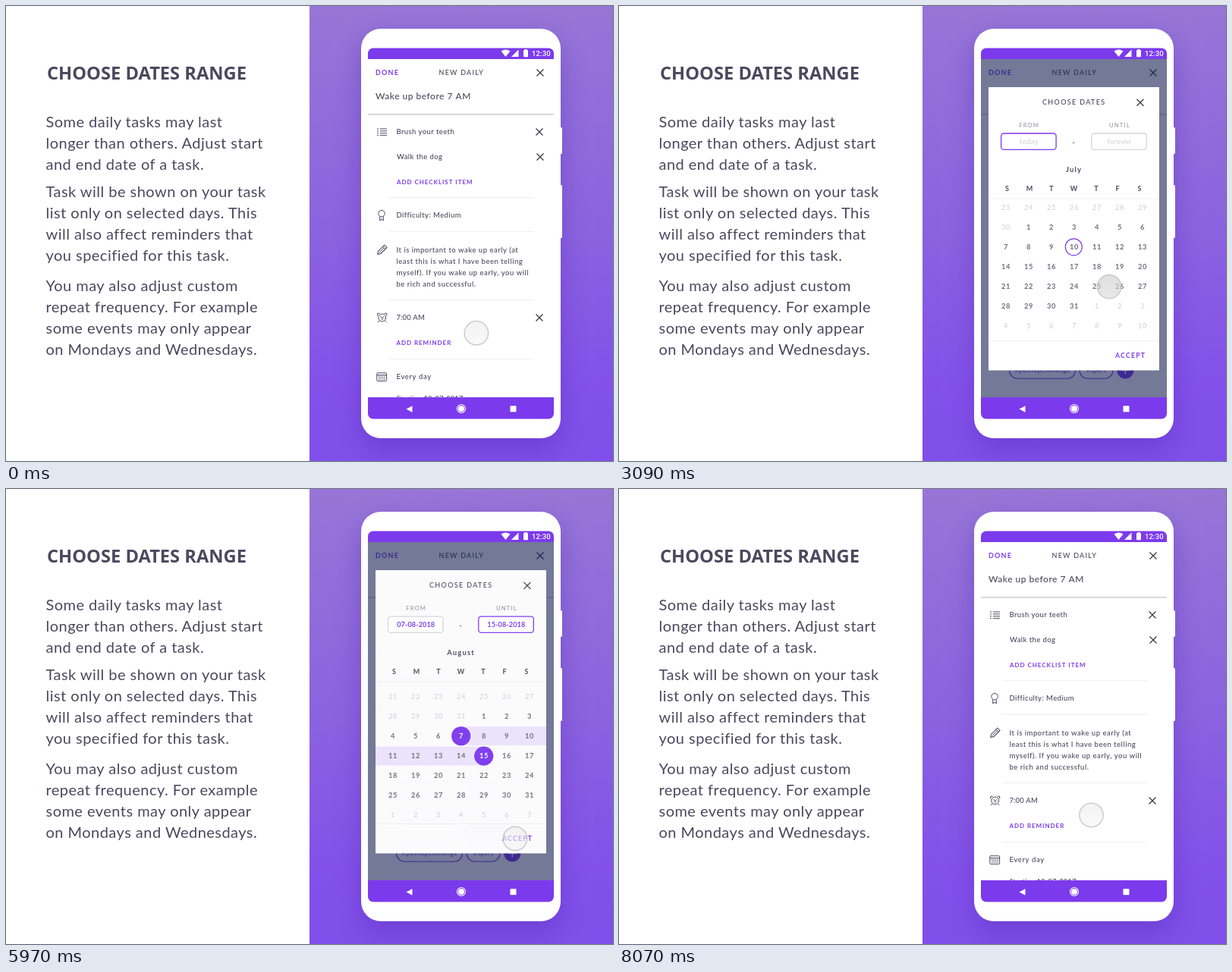
Recreate the animation shown at these times as an HTML page with a canvas. Size 800 by 600 pixels, loop 8.13 s.

```html
<!DOCTYPE html>
<html lang="en">
<head>
<meta charset="utf-8">
<title>Choose dates range</title>
<style>
html, body { margin: 0; width: 100%; height: 100%; overflow: hidden; background: #fff; }
#stage { position: relative; width: 800px; height: 600px; overflow: hidden; }
canvas { position: absolute; left: 0; top: 0; }
h1, p { position: absolute; margin: 0; white-space: nowrap; color: #4b485e; }
h1 { left: 54px; top: 72px; font: 700 23.7px/32px "Open Sans", "Noto Sans", sans-serif; }
p { left: 52.5px; font: 400 20px/28px Lato, sans-serif; letter-spacing: .47px; }
</style>
</head>
<body>
<div id="stage">
<canvas id="c" width="800" height="600"></canvas>
<h1>CHOOSE DATES RANGE</h1>
<p style="top:137.5px">Some daily tasks may last<br>longer than others. Adjust start<br>and end date of a task.</p>
<p style="top:229.5px">Task will be shown on your task<br>list only on selected days. This<br>will also affect reminders that<br>you specified for this task.</p>
<p style="top:353.5px">You may also adjust custom<br>repeat frequency. For example<br>some events may only appear<br>on Mondays and Wednesdays.</p>
</div>
<script>
const g = document.getElementById('c').getContext('2d');
const LOOP = 8130, PURPLE = '#7c3aed', INK = '#4b485e', DARK = '#3b394a', PALE = '#d2d2da', RULE = '#efeff2';

const clamp = v => Math.max(0, Math.min(1, v));
const ramp = (t, a, b) => clamp((t - a) / (b - a));
const ease = u => u < .5 ? 4 * u * u * u : 1 - 4 * (1 - u) ** 3;
const smooth = (t, a, b) => ease(ramp(t, a, b));

// Interpolates rows of [time, ...values]
function track(keys, t) {
  let i = 0;
  while (i < keys.length - 2 && t >= keys[i + 1][0]) i++;
  const a = keys[i], b = keys[i + 1], k = smooth(t, a[0], b[0]);
  return a.slice(1).map((v, j) => v + (b[j + 1] - v) * k);
}

const FINGER = [
  [30, 619.5, 431.5], [330, 619.5, 431.5], [1010, 632, 154.5], [1130, 632, 154.5],
  [1500, 601, 311], [2130, 601, 311], [2560, 664.5, 192.5], [2680, 664.5, 192.5],
  [3260, 644, 390], [3350, 644, 390], [3840, 600, 331], [4420, 600, 331],
  [4890, 627, 353], [5130, 627, 353], [5700, 671, 461], [6660, 671, 461],
  [7080, 650, 190], [7130, 650, 190], [7560, 640, 509], [7640, 640, 509],
  [8070, 622.5, 430], [8160, 619.5, 431.5]
];
const SCROLL = [[330, 0], [1010, 225], [1250, 196], [7130, 196], [7560, -14], [7860, 0]];
const PRESSES = [[330, 1010], [1450, 1760], [2680, 3260], [3900, 4050], [4960, 5080], [5740, 5880], [7100, 7560]];

function text(s, x, y, size, o = {}) {
  g.font = `${o.weight || 500} ${size}px ${o.font || 'Lato'}, sans-serif`;
  const ls = o.ls === undefined ? size * .042 : o.ls;
  g.letterSpacing = ls + 'px';
  g.textAlign = 'left';
  g.fillStyle = o.color || INK;
  if (o.center) x -= (g.measureText(s).width - ls) / 2;
  g.fillText(s, x, y + size * .35);
}
const caps = (s, x, y, size, ls, color, o) => text(s, x, y, size, { ls, color, weight: 700, ...o });

function line(points, color = INK, width = 1) {
  g.beginPath();
  points.forEach(([x, y], i) => i ? g.lineTo(x, y) : g.moveTo(x, y));
  g.strokeStyle = color;
  g.lineWidth = width;
  g.stroke();
}
function shape(points, color) {
  g.beginPath();
  points.forEach(([x, y]) => g.lineTo(x, y));
  g.fillStyle = color;
  g.fill();
}
function paint(fill, stroke, width) {
  if (fill) { g.fillStyle = fill; g.fill(); }
  if (stroke) { g.strokeStyle = stroke; g.lineWidth = width || 1; g.stroke(); }
}
function disc(x, y, r, fill, stroke, width) {
  g.beginPath();
  g.arc(x, y, r, 0, 7);
  paint(fill, stroke, width);
}
function box(x, y, w, h, r, fill, stroke, width) {
  g.beginPath();
  g.roundRect(x, y, w, h, r);
  paint(fill, stroke, width);
}
function cross(x, y) {
  line([[x - 4.5, y - 4.5], [x + 4.5, y + 4.5]], DARK, 1.3);
  line([[x + 4.5, y - 4.5], [x - 4.5, y + 4.5]], DARK, 1.3);
}
function layer(alpha, dy, draw) {
  if (alpha <= 0) return;
  g.save();
  g.globalAlpha *= alpha;
  g.translate(0, dy);
  draw();
  g.restore();
}

function backdrop() {
  const bg = g.createLinearGradient(0, 0, 0, 600);
  bg.addColorStop(0, '#9775d6');
  bg.addColorStop(.5, '#8b62df');
  bg.addColorStop(.85, '#8250ea');
  bg.addColorStop(1, '#804eea');
  g.fillStyle = bg;
  g.fillRect(400, 0, 400, 600);
  g.save();
  g.shadowColor = 'rgba(70,35,170,.38)';
  g.shadowBlur = 36;
  g.shadowOffsetY = 14;
  box(468, 30, 263, 540, 26, '#fff');
  g.restore();
  box(728, 160, 5, 35, 1.5, '#fff');
  box(728, 236, 5, 70, 1.5, '#fff');
}

function bars() {
  box(477, 55.5, 245, 14.5, [7, 7, 0, 0], PURPLE);
  g.beginPath();
  g.moveTo(658.5, 67);
  g.lineTo(652.5, 59.5);
  g.quadraticCurveTo(658.5, 55.5, 664.5, 59.5);
  paint('#fff');
  shape([[666, 67], [675.5, 67], [675.5, 57.5]], '#fff');
  box(682, 58, 6, 9.2, .8, '#fff');
  g.fillStyle = '#fff';
  g.fillRect(683.5, 57, 3, 2);
  text('12:30', 693, 62.6, 9.6, { font: 'Roboto', color: '#fff', ls: .1 });

  box(477, 516, 245, 28.5, [0, 0, 7, 7], PURPLE);
  shape([[527.5, 531.5], [535.5, 527.3], [535.5, 535.7]], '#fff');
  disc(600, 531, 5.5, null, '#fff', 1.1);
  disc(600, 531, 4, '#fff');
  box(664.5, 527.3, 8, 8, .6, '#fff');
}

function header() {
  caps('DONE', 487, 88, 9, 1.2, PURPLE);
  text('NEW DAILY', 570.5, 88, 9, { ls: 1.25 });
  cross(704, 88);
  text('Wake up before 7 AM', 487, 118.3, 12);
  g.fillStyle = '#d2d2d6';
  g.fillRect(477, 142, 245, 1.6);
}

function icons() {
  for (let i = 0; i < 4; i++) {
    const y = 162 + i * 2.9;
    line([[489, y], [491, y]]);
    line([[493, y], [502, y]]);
  }
  disc(495, 273.7, 4.2, null, INK);
  line([[492.7, 277.5], [492.7, 283], [495, 281], [497.3, 283], [497.3, 277.5]]);

  line([[489.5, 327.5], [490.7, 323.2], [498.7, 315.2], [502, 318.4], [494, 326.4], [489.5, 327.5]], INK, 1.1);
  line([[496.7, 317.2], [500, 320.4]]);
  line([[492, 325], [498.3, 318.8]]);

  disc(495.7, 411, 4.9, null, INK);
  line([[493.5, 409], [495.7, 411.5], [498, 409.5]]);
  line([[495.7, 411.5], [495.7, 414]]);
  for (const s of [-1, 1]) {
    line([[495.7 + s * 3, 405.3], [495.7 + s * 6, 405.3], [495.7 + s * 6, 408.5]]);
    line([[495.7 + s * 3.7, 415], [495.7 + s * 5.8, 417]]);
  }

  box(488.8, 483.8, 12.8, 10.8, 1, null, INK);
  line([[489, 486.8], [501.5, 486.8]], INK, 1.2);
  g.fillStyle = INK;
  for (let i = 0; i < 8; i++) g.fillRect(491 + i % 4 * 2.4, 488.8 + (i >> 2) * 2.5, 1.4, 1.3);

  line([[489.3, 561.2], [495.2, 555], [500.5, 554.5], [500.8, 559.4], [494.6, 565.6], [489.3, 561.2]]);
  disc(498.4, 556.9, .8, INK);
}

const CHIPS = [
  ['programming', 514, 591, 0], ['evening', 596, 655, 0],
  ['workout', 514, 569, 1], ['hard', 574, 618.5, 1], ['easy', 623, 668, 1],
  ['communication', 514, 597, 2], ['morning', 602, 660, 2],
  ['pushupchallange', 514, 602, 3], ['sport', 606.5, 651.5, 3]
];

function list() {
  icons();
  text('Brush your teeth', 514.5, 166, 9.5);
  text('Walk the dog', 515, 199, 9.5);
  caps('ADD CHECKLIST ITEM', 515, 232, 8, .95, PURPLE);
  text('Difficulty: Medium', 514.5, 276, 9.5);
  ['It is important to wake up early (at', 'least this is what I have been telling',
    'myself). If you wake up early, you will', 'be rich and successful.'
  ].forEach((s, i) => text(s, 514.5, 321.5 + i * 15, 9.5, { ls: .5 }));
  text('7:00 AM', 514.5, 411, 9.5, { ls: .1 });
  caps('ADD REMINDER', 514.5, 444, 8, .95, PURPLE);
  text('Every day', 514.5, 489, 9.5, { ls: .6 });
  text('Starting 10-07-2017', 514.5, 517.6, 9.5, { ls: .1 });
  text('Tags:', 514.5, 560.3, 9.5);
  for (const y of [252.5, 297.5, 387.5, 465.5, 537, 582.5]) line([[505, y], [696, y]], RULE);
  cross(703, 166);
  cross(704, 199);
  cross(703, 411);
  for (const [name, a, b, row] of CHIPS) {
    const y = 594 + row * 27.5, on = name === 'morning';
    box(a + .5, y - 10.8, b - a - 1, 21.6, 10.8, on ? PURPLE : '#fff', PURPLE, 1.1);
    text('#' + name, (a + b) / 2, y - .3, 8.5, { center: true, color: on ? '#fff' : PURPLE });
  }
  disc(667.3, 676.5, 11, PURPLE);
  line([[662.3, 676.5], [672.3, 676.5]], '#fff', 1.4);
  line([[667.3, 671.5], [667.3, 681.5]], '#fff', 1.4);
}

const colX = i => 509.7 + i * 30;

// Seven weeks: tail of the last month, 31 days, head of the next
function month(lead, tailStart, top, marks) {
  for (let n = 0; n < 49; n++) {
    const day = n - lead + 1, own = day > 0 && day < 32;
    const label = day < 1 ? tailStart + n : own ? day : day - 31;
    const color = !own ? PALE : marks.includes(day) ? '#fff' : '#706d80';
    text(String(label), colX(n % 7), top + Math.floor(n / 7) * 26, 9.3, { center: true, ls: .8, color, weight: own ? 700 : 500 });
  }
}

function field(x, label, hint, value, active) {
  const mid = x + 36.5;
  text(label, mid, 157.3, 7.6, { center: true, ls: 1.15, color: '#9896a5' });
  box(x, 168, 72.5, 21.3, 3.5, '#fff', active ? PURPLE : '#d6d6dc', 1.3);
  if (value) text(value, mid, 179, 9.1, { center: true, ls: .1, color: PURPLE, weight: 700 });
  else text(hint, mid, 179, 9.3, { center: true, color: PALE });
}

function calendar(t) {
  const p = smooth(t, 3250, 3720), from = t >= 3990, until = t >= 5010;
  field(503.6, 'FROM', 'today', from && '07-08-2018', !from);
  field(622.8, 'UNTIL', 'forever', until && '15-08-2018', from);
  text('-', 599, 179, 10, { center: true });
  layer(1 - p, 0, () => caps('July', 599, 215.3, 9.4, 1.1, INK, { center: true }));
  layer(p, 0, () => caps('August', 599, 215.3, 9.4, 1.2, INK, { center: true }));
  [511.5, 541, 570, 599.5, 629, 657, 686].forEach((x, i) =>
    caps('SMTWTFS'[i], x, 240.5, 9, 0, INK, { center: true }));
  line([[487, 254], [712, 254]], RULE);
  line([[487, 441.5], [712, 441.5]], RULE);
  caps('ACCEPT', 654, 461, 8.7, 1.25, PURPLE);

  layer(ramp(t, 1740, 1890), 0, () => {
    layer(1 - p, 60 * p, () => {
      disc(colX(3) - .4, 317.8, 11, null, PURPLE, 1.2);
      month(8, 23, 266, []);
    });
    layer(p, -80 * (1 - p), () => {
      layer(ramp(t, 5010, 5190), 0, () => {
        g.fillStyle = 'rgba(124,58,237,.13)';
        g.fillRect(colX(3), 313, 714 - colX(3), 25);
        g.fillRect(485, 339.5, colX(4) - 485, 25);
        disc(colX(4), 352, 12.6, PURPLE);
      });
      layer(ramp(t, 3960, 4110), 0, () => disc(colX(3), 325.7, 12.6, PURPLE));
      month(11, 21, 274, [from && 7, until && 15]);
    });
  });
}

function modal(t) {
  const out = ramp(t, 5960, 6290);
  if (t < 1530 || out >= 1) return;
  layer(1 - out, 57 * out * out, () => {
    const gap = 1 - smooth(t, 1530, 1890), show = ramp(t, 1680, 1890);
    layer(ramp(t, 1530, 1720), 0, () =>
      box(487 + 10 * gap, 107 + 26 * gap, 225 - 20 * gap, 373.5 - 52 * gap, 2 * gap + .5, '#fff'));
    layer(Math.min(1, show * 3), 11 * (1 - show), () => cross(687, 127.3));
    layer(show, 11 * (1 - show), () => {
      text('CHOOSE DATES', 558, 127, 9, { ls: 1.35 });
      calendar(t);
    });
  });
}

function finger(t) {
  const [x, y] = track(FINGER, t < 30 ? t + LOOP : t);
  const press = Math.max(...PRESSES.map(([a, b]) => Math.min(ramp(t, a, a + 90), 1 - ramp(t, b - 30, b + 60))));
  const tone = 235 - 30 * press;
  const fill = g.createLinearGradient(x, y - 16, x, y + 16);
  fill.addColorStop(0, `rgba(${tone},${tone},${tone},.64)`);
  fill.addColorStop(1, `rgba(${tone + 10},${tone + 10},${tone + 10},.56)`);
  disc(x, y, 15.7, fill, 'rgba(190,190,194,.75)', 1.5);
}

function draw(t) {
  g.clearRect(0, 0, 800, 600);
  backdrop();
  g.save();
  g.beginPath();
  g.rect(477, 143, 245, 373);
  g.clip();
  g.translate(0, -track(SCROLL, t)[0]);
  list();
  g.restore();
  header();
  const dim = .6 * Math.min(ramp(t, 1500, 1740), 1 - ramp(t, 6180, 6440));
  if (dim > 0) {
    g.fillStyle = `rgba(22,33,82,${dim})`;
    g.fillRect(477, 70, 245, 446);
  }
  bars();
  modal(t);
  finger(t);
}

let start;
function tick(now) {
  if (start === undefined) start = now;
  draw((now - start) % LOOP);
  requestAnimationFrame(tick);
}
draw(0);
requestAnimationFrame(tick);
</script>
</body>
</html>
```
